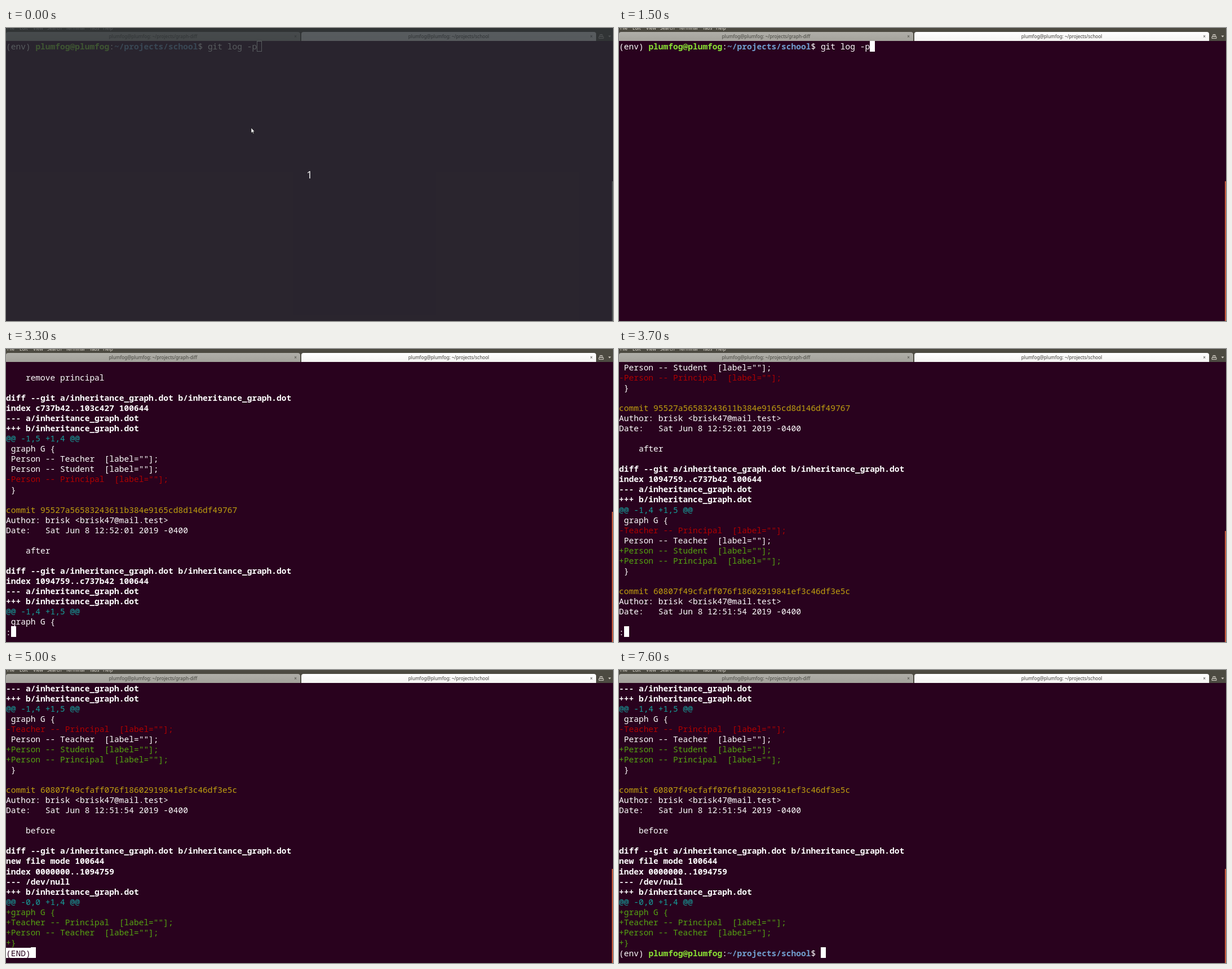
These frames come from a looping animation (1077 px wide and 520 px high, 8 s). An HTML page:

```html
<!DOCTYPE html>
<html lang="en">
<head>
<meta charset="utf-8">
<title>Terminal: git log</title>
<style>
  :root { --row: 18.06px; }
  html, body { margin: 0; width: 100%; height: 100%; overflow: hidden; background: #29021e; }
  #stage { position: relative; width: 1077px; height: 520px; overflow: hidden; background: #29021e; }
  #stage div, #stage svg { position: absolute; }
  #bar { width: 1077px; height: 22.6px; overflow: hidden; background: #4c4a41; font: 8.2px "Noto Sans", "Open Sans", sans-serif; }
  #bar span { position: absolute; top: -8px; line-height: 16px; color: #dfdbd2; white-space: pre; }
  #bar .tab { top: 7px; height: 16px; line-height: 16.5px; text-align: center; border-radius: 4px 4px 0 0;
    color: #45453f; background: linear-gradient(#b0afa9, #a3a29b); }
  #bar .tab.open { color: #3c3b37; background: linear-gradient(#fff, #f4f3f1); }
  #bar .tab span { top: 0; right: 6px; line-height: 16px; color: inherit; }
  .text { font: 14.55px/var(--row) "Noto Sans Mono", "DejaVu Sans Mono", monospace; white-space: pre; color: #fff; }
  .text p { margin: 0; height: var(--row); }
  #pager { top: 23px; width: 1070px; height: calc(26 * var(--row)); overflow: hidden; }
  #log { left: 0; }
  #prompt, #status { left: 0; height: var(--row); }
  .b { font-weight: 700; }
  .y { color: #c0a010; }
  .c { color: #16a09c; }
  .r { color: #b00000; }
  .g { color: #55a312; }
  .user { font-weight: 700; color: #8ae234; }
  .path { font-weight: 700; color: #729fcf; }
  .end { display: inline-block; height: 18.5px; background: #fff; color: #29021e; }
  #cursor { width: 9px; height: 19px; box-sizing: border-box; background: #fff; }
  #thumb { right: 0; bottom: 0; width: 2.2px; background: #c65a3c; }
  .idle #cursor { background: none; border: 1px solid #fff; }
  .idle #thumb { background: #c8c5c0; }
  #shade { inset: 0; background: rgba(42, 47, 50, .78); }
  #count { left: 0; top: 248px; width: 1077px; text-align: center; color: #e8e8e8;
    font: 18.5px/24px "Noto Sans", "Open Sans", sans-serif; }
</style>
</head>
<body>
<div id="stage">
  <div id="bar">
    <span style="left:2px">File</span><span style="left:24px">Edit</span><span style="left:48px">View</span>
    <span style="left:73px">Search</span><span style="left:106px">Terminal</span>
    <span style="left:148px">Tabs</span><span style="left:172px">Help</span>
    <div class="tab" style="left:0;width:522px">plumfog@plumfog: ~/projects/graph-diff<span>×</span></div>
    <div class="tab open" style="left:524px;width:523px">plumfog@plumfog: ~/projects/school<span>×</span></div>
    <svg style="left:1050px;top:9px" width="27" height="12" fill="none" stroke="#d5d1c8">
      <path d="M2 9.5h8v-3h-8zM3 6.5l1-4h4l1 4M6 3v3"/>
      <path d="M18.500 4.500h5l-2.500 3z" fill="#d5d1c8" stroke="none"/>
    </svg>
  </div>
  <div id="pager" class="text"><div id="log"></div></div>
  <div id="cursor"></div>
  <div id="prompt" class="text" style="top:23px"></div>
  <div id="status" class="text" style="top:calc(23px + 26 * var(--row))"></div>
  <div id="thumb"></div>
  <div id="shade"><div id="count">1</div></div>
  <svg id="arrow" style="left:434px;top:176px" width="10" height="14">
    <path d="M1 1v9.500l2.200-2 1.500 3.300 1.400-.7-1.500-3.100h2.700z" fill="#fff" stroke="#111" stroke-width=".7"/>
  </svg>
  <svg id="beam" style="left:433px;top:169px" width="10" height="16" fill="none">
    <path d="M2 2.500h2l.5.5.5-.5h2M4.500 3v9.500M2 13h2l.5-.5.5.5h2" stroke="#ddd" stroke-width="2"/>
    <path d="M2 2.500h2l.5.5.5-.5h2M4.500 3v9.500M2 13h2l.5-.5.5.5h2" stroke="#111" stroke-width=".9"/>
  </svg>
</div>
<script>
  const LOOP = 8000, ROW = 18.06, CELL = 8.73, LAST_ROW = 26;
  const $ = id => document.getElementById(id);
  const esc = s => s.replace(/</g, '&lt;').replace(/>/g, '&gt;');
  const line = (text, cls = '') => `<p class="${cls}">${esc(text)}</p>`;
  const edge = (a, b, sign = ' ') =>
    line(`${sign}${a} -- ${b}  [label=""];`, { '-': 'r', '+': 'g' }[sign]);

  const file = 'inheritance_graph.dot';
  const commit = (hash, time, message) =>
    line(`commit ${hash}`, 'y') +
    line('Author: brisk <brisk47@mail.test>') +
    line(`Date:   Sat Jun 8 ${time} 2019 -0400`) +
    line('') + line('    ' + message) + line('');
  const diff = (index, hunk, from = 'a/' + file) =>
    line(`diff --git a/${file} b/${file}`, 'b') +
    index.map(s => line(s, 'b')).join('') +
    line(`--- ${from}`, 'b') + line(`+++ b/${file}`, 'b') +
    line(`@@ ${hunk} @@`, 'c');

  $('log').innerHTML =
    commit('103c4278be52d9f06a71c3e84d95b0f2716ae38d', '12:52:09', 'remove principal') +
    diff(['index c737b42..103c427 100644'], '-1,5 +1,4') +
    line(' graph G {') +
    edge('Person', 'Teacher') + edge('Person', 'Student') + edge('Person', 'Principal', '-') +
    line(' }') + line('') +
    commit('95527a56583243611b384e9165cd8d146df49767', '12:52:01', 'after') +
    diff(['index 1094759..c737b42 100644'], '-1,4 +1,5') +
    line(' graph G {') +
    edge('Teacher', 'Principal', '-') + edge('Person', 'Teacher') +
    edge('Person', 'Student', '+') + edge('Person', 'Principal', '+') +
    line(' }') + line('') +
    commit('60807f49cfaff076f18602919841ef3c46df3e5c', '12:51:54', 'before') +
    diff(['new file mode 100644', 'index 0000000..1094759'], '-0,0 +1,4', '/dev/null') +
    line('+graph G {', 'g') +
    edge('Teacher', 'Principal', '+') + edge('Person', 'Teacher', '+') +
    line('+}', 'g');

  const shell = '(env) <span class="user">plumfog@plumfog</span>:<span class="path">~/projects/school</span>$ ';
  $('prompt').innerHTML = shell + 'git log -p';

  // Timelines: [start in ms, value]
  const scroll = [[0, -1], [2000, 0], [2500, 1], [2800, 2], [3300, 3], [3400, 5], [3500, 8], [3600, 10],
    [3700, 13], [3800, 15], [4000, 16], [4200, 17], [4700, 20], [4800, 23], [4900, 25]];
  const status = [[0, ''], [2000, ':'], [5000, '<span class="end">(END)</span>'], [6200, ''], [6500, shell]];
  const OFF = -1;
  const column = [[0, 51], [800, OFF], [1400, 51], [2000, 1], [2200, OFF], [2300, 1], [5000, 5],
    [5900, OFF], [6200, 0], [6300, OFF], [6500, 41], [6900, OFF], [7600, 41]];
  const shade = [[0, 1], [200, .5], [300, 0]];

  const at = (list, t) => list.filter(([start]) => start <= t).pop()[1];
  const show = (id, on) => { $(id).style.visibility = on ? 'visible' : 'hidden'; };

  let shownStatus = '';
  function draw(t) {
    const lines = at(scroll, t), paging = lines >= 0, col = at(column, t), text = at(status, t);
    const idle = t < 200;
    $('stage').className = idle ? 'idle' : '';
    show('log', paging);
    show('prompt', !paging);
    $('log').style.top = -Math.max(lines, 0) * ROW + 'px';
    $('thumb').style.height = 13390 / (55 + lines) + 'px';
    if (text !== shownStatus) $('status').innerHTML = shownStatus = text;

    show('cursor', col !== OFF);
    $('cursor').style.left = Math.round(col * CELL) + 'px';
    $('cursor').style.top = Math.floor(23 + (paging ? LAST_ROW * ROW : 0)) + 'px';

    $('shade').style.opacity = at(shade, t);
    show('count', idle);
    show('arrow', idle);
    show('beam', !idle && t < 1500);
  }

  const began = performance.now();
  function tick() {
    draw((performance.now() - began) % LOOP);
    requestAnimationFrame(tick);
  }
  tick();
</script>
</body>
</html>
```
